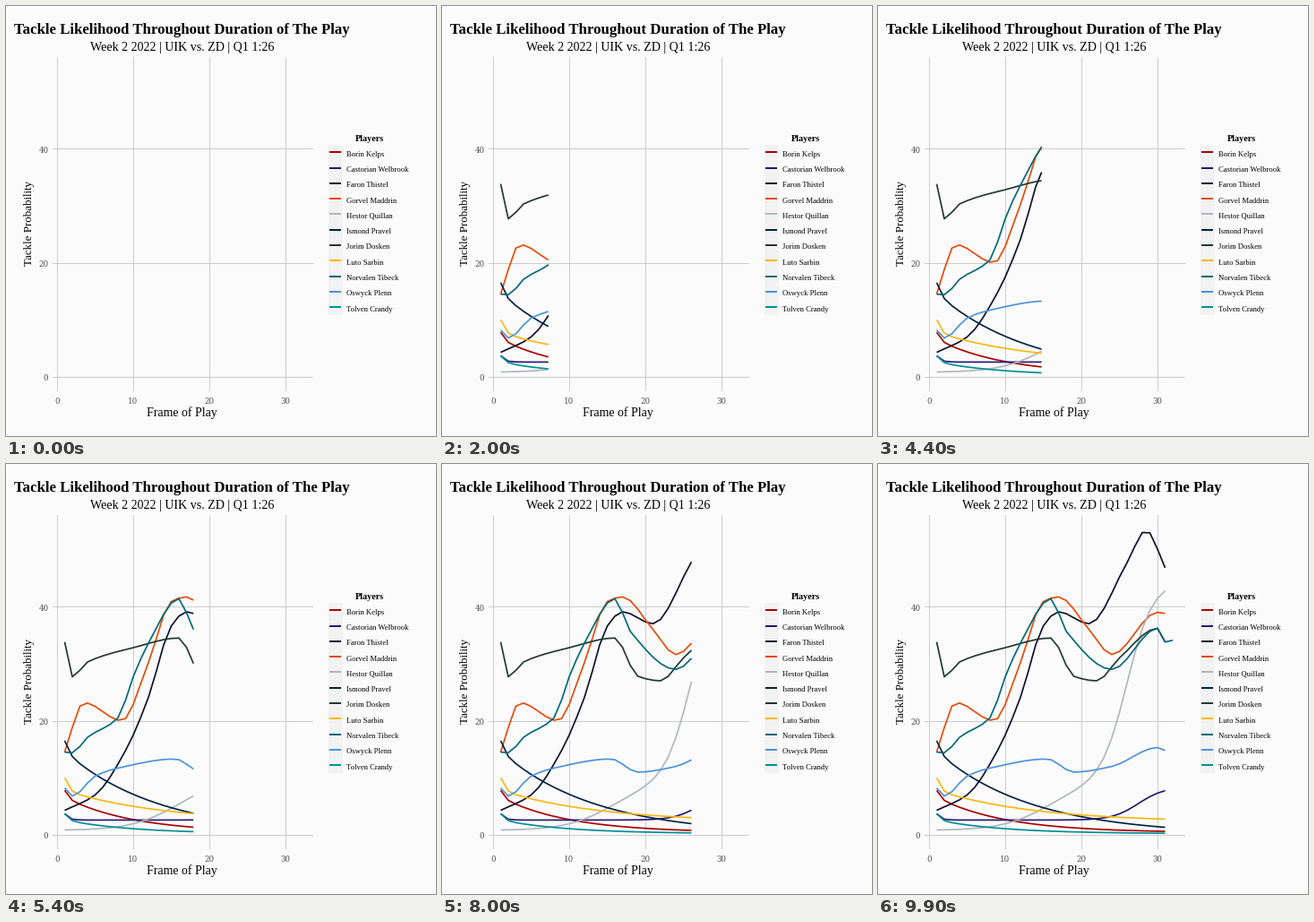
Recreate the animation shown at these times as a matplotlib script. Size 480 px wide and 480 px high, loop 10000 ms.

```python
import numpy as np
import matplotlib.pyplot as plt
from matplotlib.animation import FuncAnimation
from matplotlib.patches import Rectangle

SIZE, DPI = 480, 80
PX = 72 / DPI                      # one pixel in points
FRAMES, INTERVAL = 100, 100
LAST = 32                          # last step of the play
PAPER, KEY, GRID, TICK = "#FBFBFB", "#F2F2F2", "#CCCCCC", "#4D4D4D"
LEFT, RIGHT, TOP, BOTTOM = 52, 341.6, 57, 429

fig = plt.figure(figsize=(SIZE / DPI, SIZE / DPI), dpi=DPI, facecolor=PAPER)
ax = fig.add_axes([0, 0, 1, 1])
ax.set(xlim=(0, SIZE), ylim=(SIZE, 0))
ax.axis("off")


def sx(step):
    return 57 + 8.5 * np.asarray(step)


def sy(prob):
    return 414 - 6.37 * np.asarray(prob)


def stroke(x, y, color, width, smooth=False):
    return ax.plot(x, y, color=color, lw=width * PX, antialiased=smooth,
                   solid_capstyle="butt", solid_joinstyle="round")[0]


def label(x, y, text, size, font="Liberation Serif", **kw):
    kw = {"ha": "center", "va": "baseline", "color": "black", **kw}
    ax.text(x, y, text, fontsize=size * PX, family=font, **kw)


# Building blocks for the probability curves, sampled at each step
STEPS = np.arange(1, LAST)


def decay(height, span):
    return height * np.exp((1 - STEPS) / span)


def rise(height, middle, span):
    return height / (1 + np.exp((middle - STEPS) / span))


def through(*points):
    """Monotone cubic through a few (step, probability) points."""
    x, y = np.array(points, float).T
    h = np.diff(x)
    d = np.diff(y) / h
    a, b = d[:-1], d[1:]
    inner = [2 * p * q / (p + q) if p * q > 0 else 0 for p, q in zip(a, b)]
    m = np.array([d[0], *inner, d[-1]])
    s = np.arange(x[0], x[-1] + 1)
    k = np.clip(np.searchsorted(x, s, side="right") - 1, 0, len(h) - 1)
    t = (s - x[k]) / h[k]
    ease = t * t * (3 - 2 * t)
    bend = t * (1 - t) * (m[k] * (1 - t) - m[k + 1] * t)
    return y[k] + (y[k + 1] - y[k]) * ease + h[k] * bend


curves = []


def player(name, color, probs):
    """Add a legend row and an empty curve for one player."""
    y = 163.3 + 17.28 * len(curves)
    ax.add_patch(Rectangle((360, y - 7.94), 16, 17.28, fc=KEY, lw=0,
                           antialiased=False))
    stroke([361, 373.8], [y, y], color, 2)
    label(380, y + 4.5, name, 8.6, ha="left")
    curves.append((stroke([], [], color, 1.7, smooth=True), probs))


# Panel and text
ax.add_patch(Rectangle((0.5, 0.5), SIZE - 1, SIZE - 1, fc="none", ec="white",
                       lw=PX))
for p in (0, 20, 40):
    stroke([LEFT, RIGHT], [sy(p), sy(p)], GRID, 1)
    label(47.5, sy(p) + 4.5, str(p), 8.6, "DejaVu Serif", ha="right",
          color=TICK)
for s in (0, 10, 20, 30):
    stroke([sx(s), sx(s)], [TOP, BOTTOM], GRID, 1)
    label(sx(s), 443.5, str(s), 8.6, "DejaVu Serif", color=TICK)

label(196.8, 31, "Tackle Likelihood Throughout Duration of The Play", 16.75,
      weight="bold")
label(197, 50, "Week 2 2022 | UIK vs. ZD | Q1 1:26", 14.05)
label(196, 458, "Frame of Play", 13.9)
label(26.5, 243, "Tackle Probability", 13, rotation=90, va="center")
label(406, 151, "Players", 10.1, weight="bold")

# Curves
player("Borin Kelps", "#AA0000", 0.4 + decay(6.2, 9) + decay(1.2, 0.4))
player("Castorian Welbrook", "#241773",
       2.6 + decay(1.1, 0.5) + rise(5.8, 27.5, 1.7))
player("Faron Thistel", "#0B0F2A",
       through((1, 4.3), (5, 7), (9, 14.8), (12, 24.1), (15, 36.6),
               (17, 39.1), (21, 37), (26, 47.7), (28.5, 53.4), (31, 46.8)))
player("Gorvel Maddrin", "#E64A0A",
       through((1, 14.5), (3.5, 23.2), (8.5, 20), (12, 30.2), (15, 40.9),
               (17, 41.7), (21, 36), (24, 31.6), (30, 39), (31, 38.8)))
player("Hestor Quillan", "#B0B7BC",
       0.8 + rise(8.3, 15.5, 3) + rise(35.5, 26, 1.7))
player("Ismond Pravel", "#002244", decay(14.6, 12.5) + decay(1.9, 0.5))
player("Jorim Dosken", "#203731",
       through((1, 33.8), (2, 27.7), (4, 30.3), (10, 32.8), (16, 34.5),
               (19, 27.8), (22, 27), (25, 31), (30, 36.2), (31, 33.8)))
player("Luto Sarbin", "#FFB612", 2.2 + decay(5.6, 13) + decay(2.2, 0.5))
player("Norvalen Tibeck", "#006778",
       through((1, 14.5), (2, 14.4), (4, 17.1), (8, 20.5), (10, 27.7),
               (12, 33.6), (16, 41.4), (18, 35.7), (24, 29), (30, 36.2),
               (31, 33.8), (32, 34.1)))
player("Oswyck Plenn", "#4B92DB",
       through((1, 8.2), (2, 6.8), (5, 10.3), (8, 11.7), (15.5, 13.3),
               (19, 11), (24, 12), (30, 15.3), (31, 14.8)))
player("Tolven Crandy", "#008E97", 0.2 + decay(2.4, 9) + decay(1.1, 0.5))


def draw(i):
    now = 1 + (LAST - 1) * i / (FRAMES - 1)
    for line, probs in curves:
        steps = np.arange(1, len(probs) + 1)
        end = min(now, steps[-1])
        x = np.append(steps[steps < end], end)
        line.set_data(sx(x), sy(np.interp(x, steps, probs)))
    return [line for line, _ in curves]


anim = FuncAnimation(fig, draw, frames=FRAMES, interval=INTERVAL,
                     init_func=lambda: draw(0), repeat=True, repeat_delay=0)
plt.show()
```
